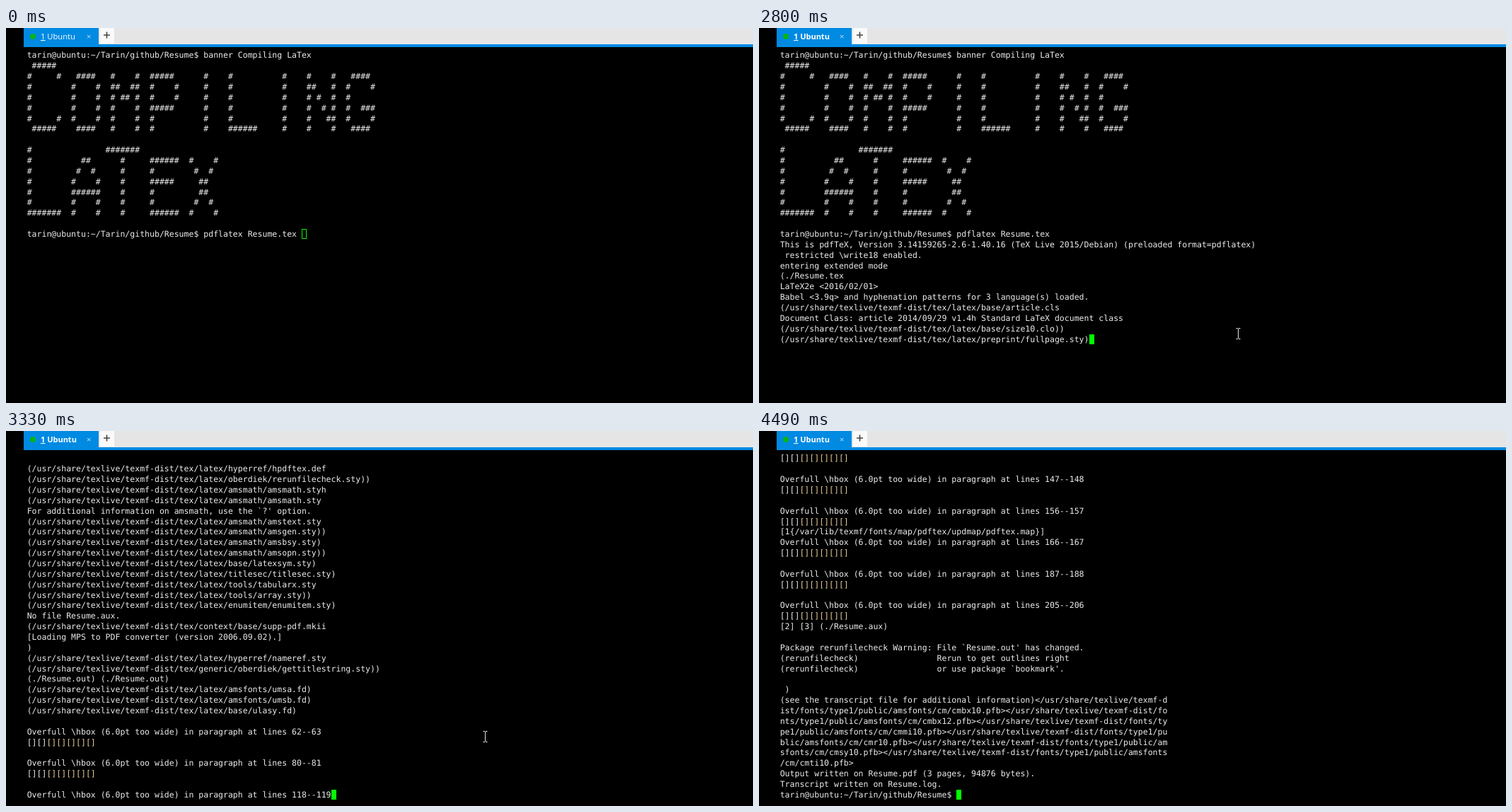
Animation of 1056x530 px, one loop 6.35 s. Source, as an HTML page:

```html
<!DOCTYPE html>
<html lang="en">
<head>
<meta charset="utf-8">
<title>Compiling LaTeX</title>
<style>
  html, body { margin: 0; width: 100%; height: 100%; overflow: hidden; background: #000; }
  #stage { position: relative; width: 1056px; height: 530px; overflow: hidden; background: #000; }
  svg { position: absolute; left: 0; top: 0; }
  #tab text { font: 11.2px "Open Sans", sans-serif; fill: #fff; }
  #tab.focus #title { font-weight: 700; font-size: 11px; }
  #screen {
    position: absolute; left: 29.7px; top: 31.4px; margin: 0;
    font: 11.52px/14.865px "DejaVu Sans Mono", monospace;
    text-rendering: geometricPrecision;
    font-variant-ligatures: none;
    color: #ececec;
  }
  #screen i { font-style: normal; color: #e8cf9e; }
  #cursor { position: absolute; width: 7px; height: 14px; box-sizing: border-box; border: 1px solid #0f0; }
  .focus ~ #cursor { background: #0f0; }
</style>
</head>
<body>
<div id="stage">
  <svg id="tab" width="1056" height="28">
    <path d="M25 0H1056V23H25Z" fill="#e5e5e5"/>
    <path d="M25 0H131V23H1056V27H25Z" fill="#008ae2"/>
    <path d="M133 0H153V22H133Z" fill="#fafafa"/>
    <path d="M138 10h9M142.5 5.5v9" stroke="#444" stroke-width="1.6"/>
    <circle cx="38" cy="12" r="4" fill="#08b418"/>
    <text id="title" x="49" y="16"><tspan text-decoration="underline">1</tspan> Ubuntu</text>
    <text x="114" y="16" style="fill:#c4def5">×</text>
  </svg>
  <pre id="screen"></pre>
  <div id="cursor"></div>
  <svg width="1056" height="530">
    <path id="mouse" d="M-3 -7.5h2.5M.5 -7.5h2.5M0 -7v14M-3 7.5h2.5M.5 7.5h2.5" stroke="#e8e8e8" fill="none"/>
  </svg>
</div>
<script>
const LOOP = 6350, ROWS = 33, COL = 6.935, ROW = 14.865, LEFT = 29.7, TOP = 31.4;
const PROMPT = 'tarin@ubuntu:~/Tarin/github/Resume$ ';
const DIST = '/usr/share/texlive/texmf-dist/';
const BOXES = '[]'.repeat(7);

const banner = ` #####
#     #   ####   #    #  #####      #    #          #    #    #   ####
#        #    #  ##  ##  #    #     #    #          #    ##   #  #    #
#        #    #  # ## #  #    #     #    #          #    # #  #  #
#        #    #  #    #  #####      #    #          #    #  # #  #  ###
#     #  #    #  #    #  #          #    #          #    #   ##  #    #
 #####    ####   #    #  #          #    ######     #    #    #   ####

#               #######
#          ##      #     ######  #    #
#         #  #     #     #        #  #
#        #    #    #     #####     ##
#        ######    #     #         ##
#        #    #    #     #        #  #
#######  #    #    #     ######  #    #
`.split('\n');

const load = names => names.split(' ').map(name => `(${DIST}tex/${name}`);

const overfull = (...starts) => starts.flatMap(n =>
  [`Overfull \\hbox (6.0pt too wide) in paragraph at lines ${n}--${n + 1}`, BOXES, '']);

const fonts = ['cmbx10', 'cmbx12', 'cmmi10', 'cmr10', 'cmsy10', 'cmti10']
  .map(f => `<${DIST}fonts/type1/public/amsfonts/cm/${f}.pfb>`).join('');

const log = [
  PROMPT + 'banner Compiling LaTex',
  ...banner,
  PROMPT + 'pdflatex Resume.tex ',
  'This is pdfTeX, Version 3.14159265-2.6-1.40.16 (TeX Live 2015/Debian) (preloaded format=pdflatex)',
  ' restricted \\write18 enabled.',
  'entering extended mode',
  '(./Resume.tex',
  'LaTeX2e <2016/02/01>',
  'Babel <3.9q> and hyphenation patterns for 3 language(s) loaded.',
  ...load('latex/base/article.cls'),
  'Document Class: article 2014/09/29 v1.4h Standard LaTeX document class',
  ...load('latex/base/size10.clo)) latex/preprint/fullpage.sty) latex/graphics/color.sty ' +
    'latex/latexconfig/color.cfg) latex/pdftex-def/pdftex.def generic/oberdiek/infwarerr.sty) ' +
    'generic/oberdiek/ltxcmds.sty))) latex/hyperref/hyperref.sty generic/oberdiek/hobsub-hyperref.sty ' +
    'generic/oberdiek/hobsub-generic.sty)) latex/graphics/keyval.sty) generic/ifxetex/ifxetex.sty) ' +
    'latex/oberdiek/auxhook.sty) latex/oberdiek/kvoptions.sty) latex/hyperref/pd1enc.def) ' +
    'latex/latexconfig/hyperref.cfg) latex/url/url.sty))'),
  '', 'Package hyperref Message: Driver (autodetected): hpdftex.', '',
  ...load('latex/hyperref/hpdftex.def latex/oberdiek/rerunfilecheck.sty)) ' +
    'latex/amsmath/amsmath.styh latex/amsmath/amsmath.sty'),
  "For additional information on amsmath, use the `?' option.",
  ...load('latex/amsmath/amstext.sty latex/amsmath/amsgen.sty)) latex/amsmath/amsbsy.sty) ' +
    'latex/amsmath/amsopn.sty)) latex/base/latexsym.sty) latex/titlesec/titlesec.sty) ' +
    'latex/tools/tabularx.sty latex/tools/array.sty)) latex/enumitem/enumitem.sty)'),
  'No file Resume.aux.',
  ...load('context/base/supp-pdf.mkii'),
  '[Loading MPS to PDF converter (version 2006.09.02).]', ')',
  ...load('latex/hyperref/nameref.sty generic/oberdiek/gettitlestring.sty))'),
  '(./Resume.out) (./Resume.out)',
  ...load('latex/amsfonts/umsa.fd) latex/amsfonts/umsb.fd) latex/base/ulasy.fd)'),
  '',
  ...overfull(62),
  ...overfull(80, 118, 137, 147, 156).slice(0, -1),
  '[1{/var/lib/texmf/fonts/map/pdftex/updmap/pdftex.map}]',
  ...overfull(166, 187, 205).slice(0, -1),
  '[2] [3] (./Resume.aux)', '',
  "Package rerunfilecheck Warning: File `Resume.out' has changed.",
  '(rerunfilecheck)                Rerun to get outlines right',
  "(rerunfilecheck)                or use package `bookmark'.",
  '', ' )',
  ...('(see the transcript file for additional information)' + fonts).match(/.{1,79}/g),
  'Output written on Resume.pdf (3 pages, 94876 bytes).',
  'Transcript written on Resume.log.',
  PROMPT
];
const end = log.length - 1;

// time, last line on screen, text of that line while it is still being written
const output = [
  [0, 17], [2400, 18, ''], [2630, 20, ''], [2710, 23], [2790, 27], [2860, 32],
  [2940, 36, log[35]], [3020, 41], [3100, 46], [3170, 49], [3260, 60],
  [3330, end - 36], [3410, end - 25], [3490, end - 7, log[end - 7].slice(0, 40)], [3550, end]
];

// time, x, y
const pointer = [
  [0, -50, -50], [380, 715.5, 471], [460, 677.5, 432], [3940, 835.5, 477], [4030, 919.5, 504],
  [4180, 927.5, 507], [4260, 948.5, 512], [4340, 975.5, 518], [4410, 1011.5, 527], [4490, -50, -50]
];

const $ = id => document.getElementById(id);
const at = (table, t) => table.findLast(step => step[0] <= t);
const markup = line => line === BOXES
  ? `${line.slice(0, 4)}<i>${line.slice(4)}</i>`
  : line.replace(/&/g, '&amp;').replace(/</g, '&lt;');

let shown;
function print(step) {
  if (step === shown) return;
  shown = step;
  const [, last, text = log[last]] = step;
  const first = Math.max(0, last - ROWS + 1);
  $('screen').innerHTML = [...log.slice(first, last), text].map(markup).join('\n');
  $('cursor').style.left = Math.round(LEFT + text.length * COL) + 'px';
  $('cursor').style.top = Math.round(TOP + (last - first) * ROW) + 'px';
}

const start = performance.now();
function draw() {
  const t = (performance.now() - start) % LOOP;
  const [, x, y] = at(pointer, t);
  print(at(output, t));
  $('tab').classList.toggle('focus', t >= 1090);
  $('mouse').setAttribute('transform', `translate(${x} ${y})`);
  requestAnimationFrame(draw);
}
draw();
</script>
</body>
</html>
```
